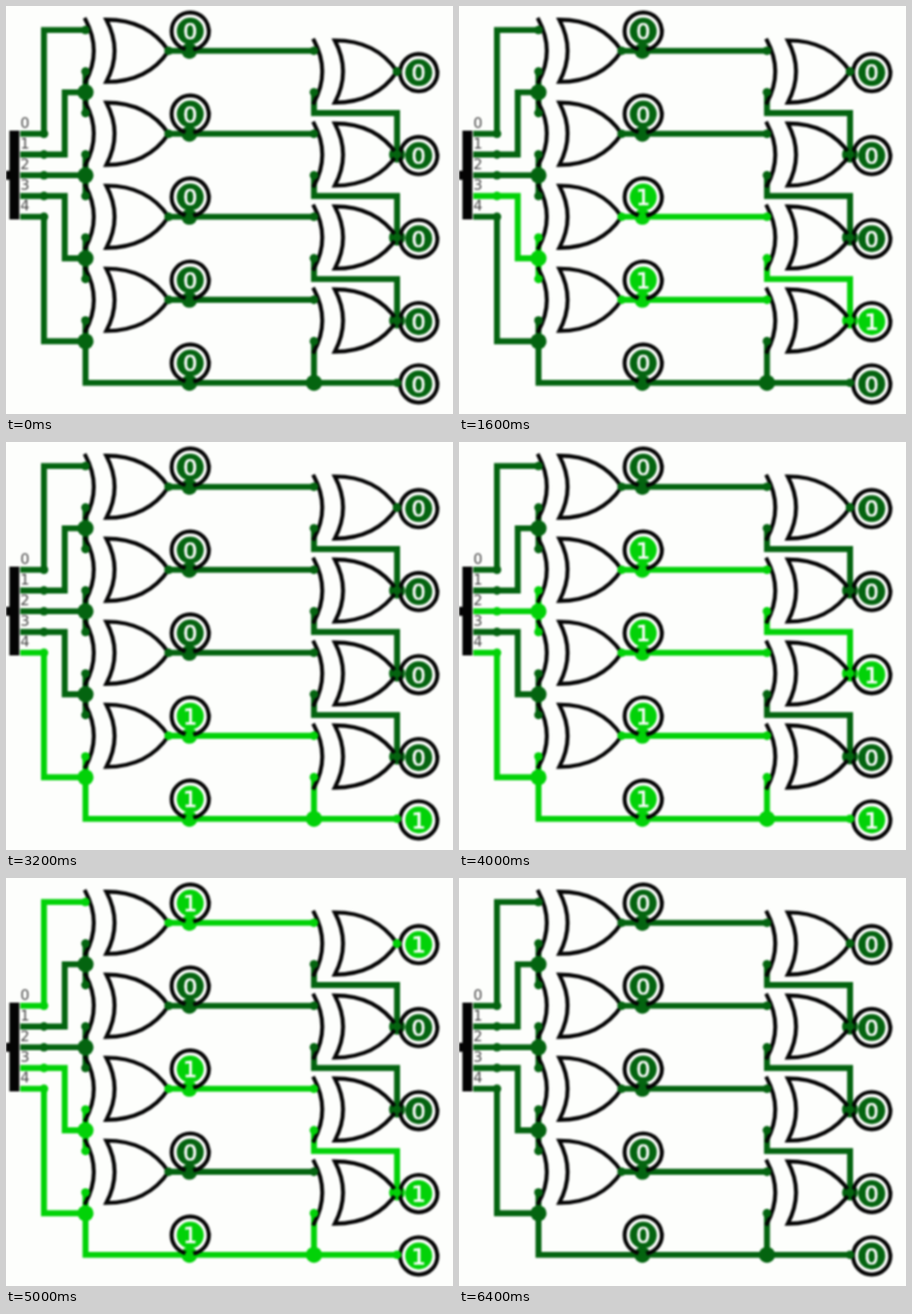
Animation of 498 by 455 pixels, one loop 6600 ms. Source, as an HTML page with a canvas:

```html
<!DOCTYPE html>
<html lang="en">
<head>
<meta charset="utf-8">
<title>Gray code circuit</title>
<style>
  html, body { margin: 0; width: 100%; height: 100%; overflow: hidden; background: #fdfefc; }
  canvas { display: block; filter: blur(0.85px); }
</style>
</head>
<body>
<canvas id="stage" width="498" height="455"></canvas>
<script>
const ctx = document.getElementById("stage").getContext("2d");

const STEP = 200, STEPS = 33;
const UNIT = 2.314;            // pixels per circuit unit
const GRID = UNIT * 10;
const X = i => 42.3 + i * GRID;
const Y = j => 26.8 + j * GRID;
const BLACK = "#040404", PAPER = "#fdfefc", ON = "#02d208", OFF = "#046410";

const level = bit => bit ? ON : OFF;

function wire(bit, ...points) {
  ctx.strokeStyle = level(bit);
  ctx.lineWidth = 6.6;
  ctx.lineCap = "square";
  ctx.lineJoin = "miter";
  ctx.beginPath();
  points.forEach(([i, j]) => ctx.lineTo(X(i), Y(j)));
  ctx.stroke();
}

function disc(color, x, y, r) {
  ctx.fillStyle = color;
  ctx.beginPath();
  ctx.arc(x, y, r, 0, Math.PI * 2);
  ctx.fill();
}

const junction = (bit, i, j) => disc(level(bit), X(i), Y(j), 9);
const port = (bit, i, j) => disc(level(bit), X(i), Y(j), 4.8);

// Exclusive-or gate whose upper input is at grid point (i, j).
function gate(i, j, upper, lower) {
  ctx.save();
  ctx.translate(X(i + 4), Y(j + 1));
  ctx.scale(UNIT, UNIT);
  ctx.strokeStyle = BLACK;
  ctx.lineWidth = 1.9;
  ctx.lineCap = "square";
  ctx.lineJoin = "miter";
  ctx.beginPath();
  ctx.moveTo(0, 0);
  ctx.quadraticCurveTo(-10, -15, -30, -15);
  ctx.quadraticCurveTo(-22, 0, -30, 15);
  ctx.quadraticCurveTo(-10, 15, 0, 0);
  ctx.closePath();
  ctx.moveTo(-40, -15);
  ctx.quadraticCurveTo(-32, 0, -40, 15);
  ctx.stroke();
  ctx.restore();
  port(upper, i, j);
  port(lower, i, j + 2);
  port(upper ^ lower, i + 4, j + 1);
}

function pin(bit, i, j) {
  const x = X(i) + 1, y = Y(j) + 1.2;
  ctx.strokeStyle = BLACK;
  ctx.lineWidth = 4.4;
  ctx.beginPath();
  ctx.arc(x, y, 20.8, 0, Math.PI * 2);
  ctx.stroke();
  disc(level(bit), x, y, 15);
  ctx.fillStyle = ctx.strokeStyle = "#fff";
  ctx.lineWidth = 0.7;
  ctx.font = '25px "DejaVu Sans", sans-serif';
  ctx.textAlign = "center";
  ctx.fillText(bit, x, y + 9.2);
  ctx.strokeText(bit, x, y + 9.2);
}

function splitter(bits) {
  ctx.fillStyle = BLACK;
  ctx.fillRect(0, Y(7) - 5, 5, 10);
  ctx.fillRect(3.8, 139, 11, 99);
  ctx.fillStyle = "#444";
  ctx.font = '16px "DejaVu Sans", sans-serif';
  ctx.textAlign = "left";
  bits.forEach((bit, k) => ctx.fillText(k, 16, Y(5 + k) - 6.8));
  bits.forEach((bit, k) => port(bit, 0, 5 + k));
}

function draw(value) {
  const bits = [0, 1, 2, 3, 4].map(k => value >> k & 1);
  const gray = bits.map((bit, k) => bit ^ (bits[k + 1] || 0));
  const rows = [0, 1, 2, 3];
  const tapRow = k => k < 4 ? 4 * k + 1 : 17;
  ctx.fillStyle = PAPER;
  ctx.fillRect(0, 0, 498, 455);

  // Bus lines fan out to the left column of gates.
  const start = -1;
  wire(bits[0], [start, 5], [0, 5], [0, 0], [2, 0]);
  wire(bits[1], [start, 6], [1, 6], [1, 3], [2, 3]);
  wire(bits[2], [start, 7], [2, 7]);
  wire(bits[3], [start, 8], [1, 8], [1, 11], [2, 11]);
  wire(bits[4], [start, 9], [0, 9], [0, 15], [2, 15]);
  wire(bits[4], [2, 14], [2, 17], [17, 17]);
  wire(bits[4], [13, 15], [13, 17]);
  for (const k of [1, 2, 3]) {
    wire(bits[k], [2, 4 * k - 2], [2, 4 * k]);
    wire(bits[k], [13, 4 * k - 1], [13, 4 * k], [17, 4 * k], [17, 4 * k + 2]);
    junction(bits[k], 17, 4 * k + 2);
  }
  for (const k of [1, 2, 3, 4]) junction(bits[k], 2, 4 * k - 1);
  junction(bits[4], 13, 17);
  rows.forEach(k => wire(gray[k], [6, 4 * k + 1], [13, 4 * k + 1]));
  gray.forEach((bit, k) => junction(bit, 7, tapRow(k)));

  splitter(bits);
  for (const k of rows) {
    gate(2, 4 * k, bits[k], bits[k + 1]);
    gate(13, 4 * k + 1, gray[k], bits[k + 1]);
    pin(bits[k], 18, 4 * k + 2);
    port(bits[k], 17, 4 * k + 2);
  }
  pin(bits[4], 18, 17);
  port(bits[4], 17, 17);
  gray.forEach((bit, k) => {
    pin(bit, 7, tapRow(k) - 1);
    port(bit, 7, tapRow(k));
  });
}

const began = performance.now();
function frame() {
  const step = Math.floor((performance.now() - began) / STEP) % STEPS;
  draw(step & 31);
  requestAnimationFrame(frame);
}
frame();
</script>
</body>
</html>
```
